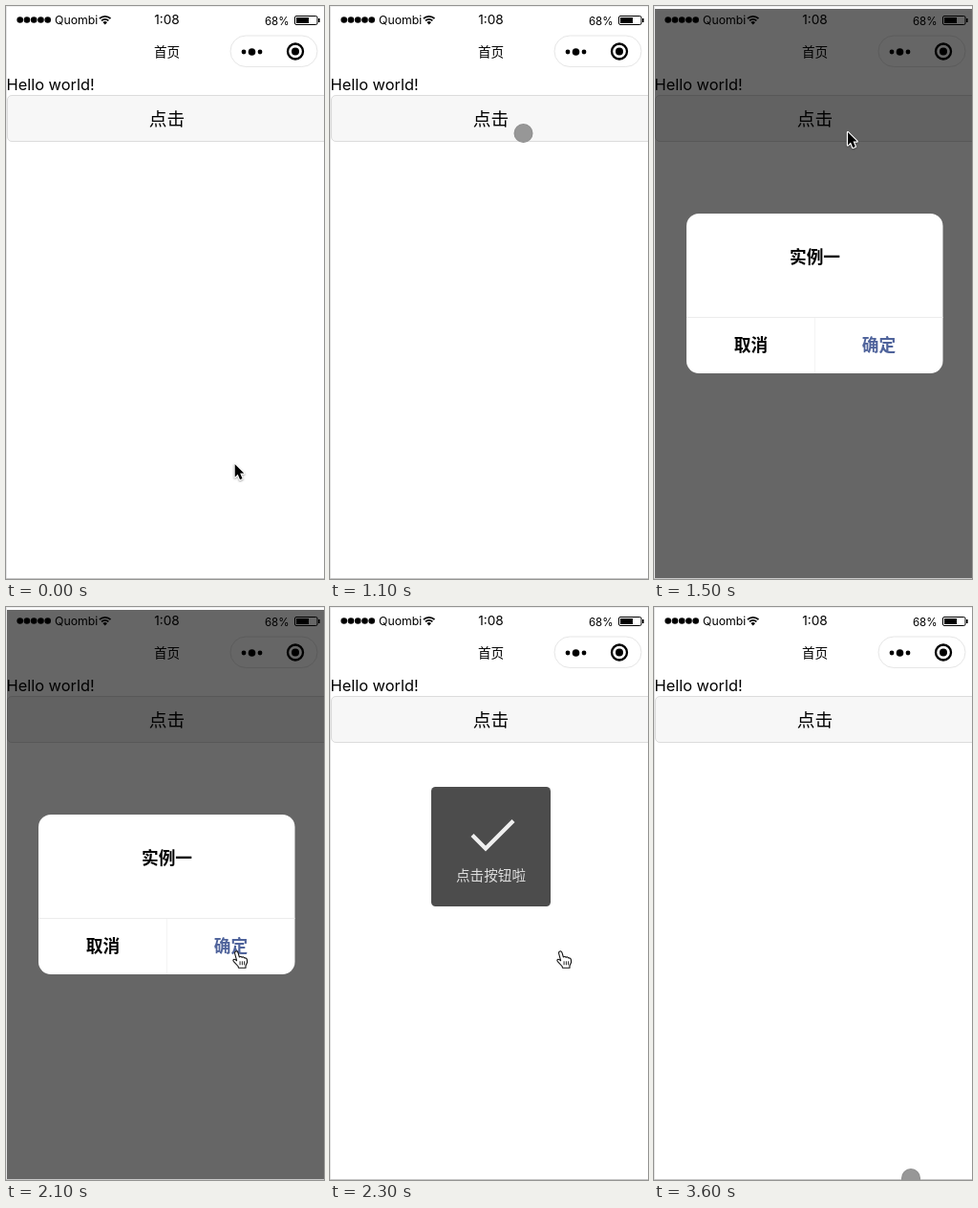
These frames come from a looping animation (333x599 px, 3.7 s). An HTML page with a canvas:

```html
<!DOCTYPE html>
<html lang="zh-CN">
<head>
<meta charset="utf-8">
<title>首页</title>
<style>
html, body { margin: 0; width: 100%; height: 100%; overflow: hidden; background: #fff; }
canvas { display: block; width: 333px; height: 599px; }
</style>
</head>
<body>
<canvas id="stage"></canvas>
<script>
const W = 333, H = 599, LOOP = 3700, STEP = 100;
const LATIN = 'Inter, Roboto, sans-serif';
const HAN = '"Noto Sans CJK SC", "Noto Sans CJK", sans-serif';

const canvas = document.getElementById('stage');
const ctx = canvas.getContext('2d');
const dpr = window.devicePixelRatio || 1;
canvas.width = W * dpr;
canvas.height = H * dpr;
ctx.scale(dpr, dpr);

const arrowPath = new Path2D('M0 0V13.4L3 10.6L5.3 16L7.8 14.9L5.5 9.6H9.6Z');
const handPath = new Path2D('M3.2 1.2C4.4 .3 5.6 1 6 2.4L7.4 7C8 6.3 9.6 6.3 10.1 7.3C11 6.6 12.4 6.9 12.8 8' +
  'C14 7.6 15.2 8.3 15.4 9.6L15.6 12.5L14 16V18.2H6.5L6 16.5L1.2 11.3C.2 9.8 1.8 8.6 3.2 9.6L4.6 10.7L2.6 3.2' +
  'C2.4 2.4 2.6 1.6 3.2 1.2Z');

function text(str, x, y, size, color = '#000', align = 'left') {
  ctx.font = `400 ${size}px ${LATIN}`;
  ctx.textAlign = align;
  ctx.fillStyle = color;
  ctx.fillText(str, x, y);
}

// Chinese text centred on (x, y)
function han(str, x, y, size, color = '#000', weight = 400) {
  ctx.font = `${weight} ${size}px ${HAN}`;
  ctx.textAlign = 'center';
  ctx.fillStyle = color;
  ctx.fillText(str, x, y + size * 0.38);
}

function rect(x, y, w, h, color) {
  ctx.fillStyle = color;
  ctx.fillRect(x, y, w, h);
}

function dot(x, y, r, color = '#000') {
  ctx.beginPath();
  ctx.arc(x, y, r, 0, Math.PI * 2);
  ctx.fillStyle = color;
  ctx.fill();
}

function roundBox(x, y, w, h, r, fill, stroke) {
  ctx.beginPath();
  ctx.roundRect(x, y, w, h, r);
  if (fill) {
    ctx.fillStyle = fill;
    ctx.fill();
  }
  if (stroke) {
    ctx.strokeStyle = stroke;
    ctx.lineWidth = 1;
    ctx.stroke();
  }
}

function drawStatusBar() {
  for (let i = 0; i < 5; i++) dot(14.7 + i * 7.25, 14.5, 3.3);
  text('Quombi', 51, 19, 12.3);
  ctx.strokeStyle = '#000';
  ctx.lineWidth = 1.7;
  for (const r of [8.2, 5.2]) {
    ctx.beginPath();
    ctx.arc(103.7, 19, r, -Math.PI * 0.75, -Math.PI * 0.25);
    ctx.stroke();
  }
  ctx.beginPath();
  ctx.moveTo(103.7, 19.4);
  ctx.arc(103.7, 19.4, 3.3, -Math.PI * 0.75, -Math.PI * 0.25);
  ctx.fillStyle = '#000';
  ctx.fill();

  text('1:08', 168.5, 19, 13.6, '#000', 'center');
  text('68%', 296.5, 19.6, 11.5, '#000', 'right');
  roundBox(302.5, 10.5, 23.5, 9, 1.5, null, '#000');
  rect(304, 12, 13, 6, '#000');
  rect(327, 13, 1.6, 4, '#000');
}

function drawPage() {
  rect(0, 0, W, H, '#fff');
  rect(0, 0, W, 1, '#eee');
  rect(0, 0, 1, H, '#e6e6e6');
  rect(0, 598, W, 1, '#c8c8c8');

  drawStatusBar();
  han('首页', 168.5, 47.5, 13.6);
  roundBox(235, 31, 91, 32.5, 16.2, '#fff', '#e6e6e6');
  dot(249, 48, 2.4);
  dot(257.5, 48, 3.8);
  dot(266, 48, 2.4);
  dot(303, 47.5, 4);
  ctx.beginPath();
  ctx.arc(303, 47.5, 8, 0, Math.PI * 2);
  ctx.strokeStyle = '#000';
  ctx.lineWidth = 2.3;
  ctx.stroke();

  text('Hello world!', 0.5, 88, 16.4);
  roundBox(1.5, 93.5, 340, 48, 4.5, '#f7f7f7', '#dcdcdc');
  han('点击', 168.5, 117.5, 18.7);
}

function drawModal(alpha) {
  if (!alpha) return;
  rect(1, 3, W - 1, 595, `rgba(0,0,0,${0.6 * alpha})`);
  roundBox(34, 217, 268.5, 167, 13, '#fff');
  ctx.globalAlpha = alpha;
  rect(34, 325, 268.5, 1, '#ececec');
  rect(168, 326, 1, 58, '#f4f4f4');
  han('实例一', 168.5, 262, 17.7, '#000', 600);
  han('取消', 101.5, 354.5, 17.7, '#000', 600);
  han('确定', 235.5, 354.5, 17.7, '#4f639b', 600);
  ctx.globalAlpha = 1;
}

function drawToast(alpha) {
  if (!alpha) return;
  ctx.globalAlpha = alpha;
  roundBox(106, 188, 125, 125, 4.5, '#4c4c4c');
  ctx.beginPath();
  ctx.moveTo(149, 238.5);
  ctx.lineTo(163, 252.5);
  ctx.lineTo(192, 223.5);
  ctx.strokeStyle = '#efefef';
  ctx.lineWidth = 4.3;
  ctx.stroke();
  han('点击按钮啦', 168.5, 280, 14.6, '#dedede');
  ctx.globalAlpha = 1;
}

const cursors = {
  arrow() {
    ctx.lineJoin = 'round';
    ctx.strokeStyle = '#fff';
    ctx.lineWidth = 2.4;
    ctx.shadowColor = 'rgba(0,0,0,.35)';
    ctx.shadowBlur = 2 * dpr;
    ctx.shadowOffsetY = dpr;
    ctx.stroke(arrowPath);
    ctx.shadowColor = 'transparent';
    ctx.fillStyle = '#000';
    ctx.fill(arrowPath);
  },
  hand() {
    ctx.translate(-4, -1);
    ctx.fillStyle = '#fff';
    ctx.fill(handPath);
    ctx.lineJoin = 'round';
    ctx.strokeStyle = '#111';
    ctx.lineWidth = 1.1;
    ctx.stroke(handPath);
    for (const x of [8, 10.3, 12.6]) rect(x - 0.4, 11.3, 0.9, 4, '#111');
  },
  touch() {
    dot(0, 0, 10, '#8c8c8c');
    dot(0, 0, 9.2, '#979797');
  }
};

// Pointer states: start time, shape, x, y; moves run between equal glide pairs
function pointerAt(t) {
  if (t <= 600) return glide('arrow', t, 0, 600, 239.7, 479, 203, 139);
  if (t < 800) return ['arrow', 202.5, 132];
  if (t < 1400) return ['touch', 202.5, 133];
  if (t <= 2100) {
    const p = glide('arrow', t, 1500, 2100, 203, 132, 241, 360);
    if (p[2] > 325) p[0] = 'hand';
    return p;
  }
  if (t < 3200) return ['hand', 241, 360];
  return glide('touch', t, 3400, 3600, 241, 364, 269, 597);
}

function glide(shape, t, from, to, x0, y0, x1, y1) {
  const u = Math.min(1, Math.max(0, (t - from) / (to - from)));
  const k = u * u * (3 - 2 * u);
  return [shape, x0 + (x1 - x0) * k, y0 + (y1 - y0) * k];
}

function modalAlpha(t) {
  if (t < 1400 || t >= 2300) return 0;
  return t < 1500 ? 0.6 : t < 2200 ? 1 : 0.4;
}

function toastAlpha(t) {
  if (t < 2300 || t >= 3100) return 0;
  return t < 3000 ? 1 : 0.45;
}

function draw(t) {
  drawPage();
  drawModal(modalAlpha(t));
  drawToast(toastAlpha(t));
  const [shape, x, y] = pointerAt(t);
  ctx.save();
  ctx.translate(x, y);
  cursors[shape]();
  ctx.restore();
}

const start = performance.now();
function tick() {
  const t = (performance.now() - start) % LOOP;
  draw(Math.floor(t / STEP) * STEP);
  requestAnimationFrame(tick);
}
tick();
</script>
</body>
</html>
```
